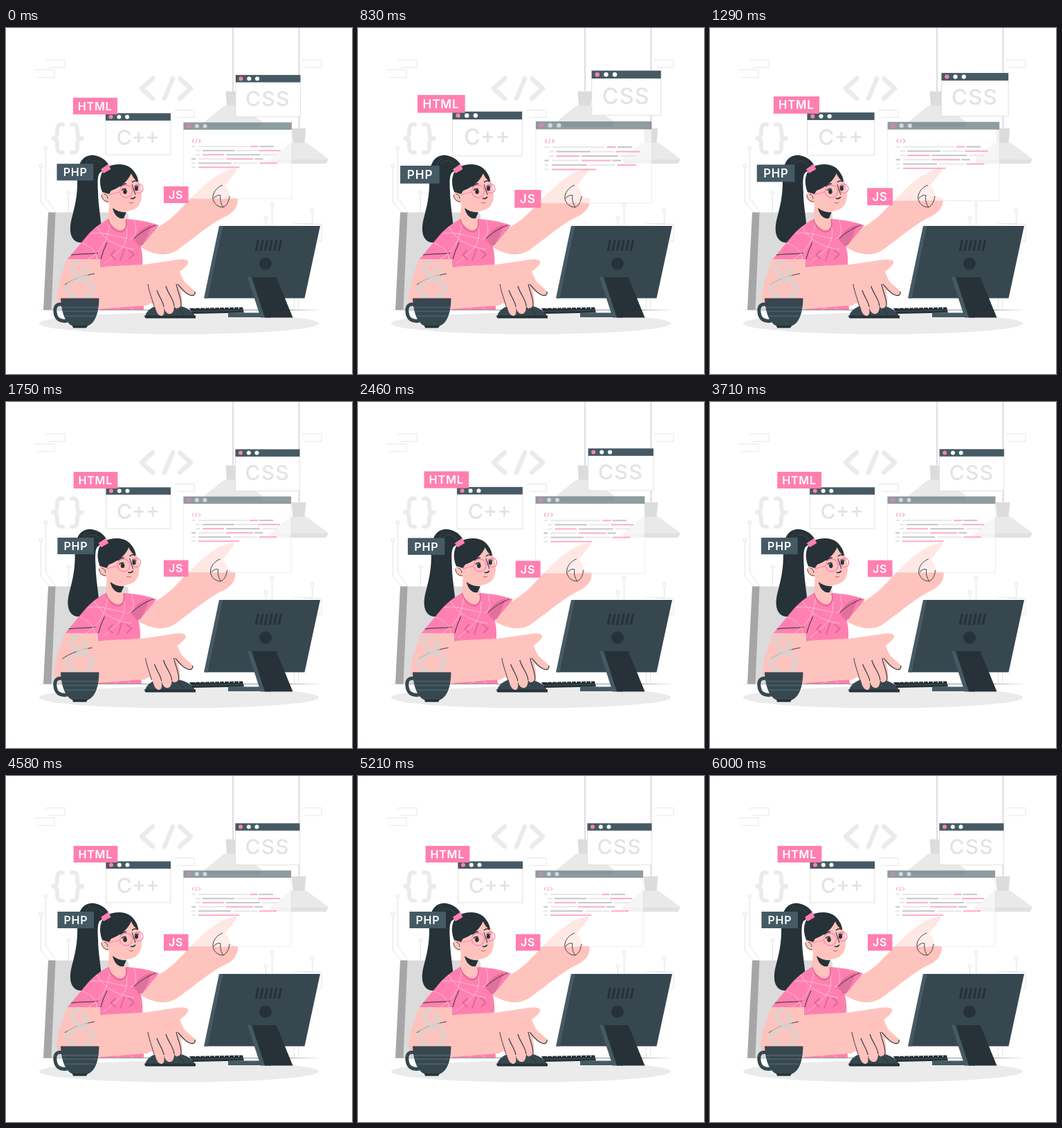
An HTML page with a canvas for the animation above (6040 ms loop, 500 by 500 pixels).

```html
<!DOCTYPE html>
<html lang="en">
<head>
<meta charset="utf-8">
<title>Coding at the desk</title>
<style>
html, body { margin: 0; width: 100%; height: 100%; overflow: hidden; background: #fff; }
canvas { display: block; width: 500px; height: 500px; }
</style>
</head>
<body>
<canvas id="c" width="500" height="500"></canvas>
<script>
const ctx = document.getElementById('c').getContext('2d');
const LOOP = 6040;
const PINK = '#ff80b0', SKIN = '#ffc3bd', INK = '#263238', SLATE = '#37474f', STEEL = '#455a64';
const PALE = '#ebebeb';

function fill(d, color) {
  ctx.fillStyle = color;
  ctx.fill(new Path2D(d));
}

function line(d, color, width = 1) {
  ctx.strokeStyle = color;
  ctx.lineWidth = width;
  ctx.stroke(new Path2D(d));
}

function disc(x, y, rx, color, ry = rx) {
  ctx.fillStyle = color;
  ctx.beginPath();
  ctx.ellipse(x, y, rx, ry, 0, 0, Math.PI * 2);
  ctx.fill();
}

function ring(x, y, r, color, width = 1) {
  ctx.strokeStyle = color;
  ctx.lineWidth = width;
  ctx.beginPath();
  ctx.arc(x, y, r, 0, Math.PI * 2);
  ctx.stroke();
}

function rect(x, y, w, h, color) {
  ctx.fillStyle = color;
  ctx.fillRect(x, y, w, h);
}

function text(s, x, y, size, weight, color, spacing) {
  ctx.font = `${weight} ${size}px Inter, sans-serif`;
  ctx.letterSpacing = spacing + 'px';
  ctx.fillStyle = color;
  ctx.fillText(s, x, y);
}

// Linear interpolation through [time, value] pairs
function track(keys, t) {
  for (let i = 1; i < keys.length; i++) {
    const [a, u] = keys[i - 1], [b, v] = keys[i];
    if (t <= b) return u + (v - u) * (t - a) / (b - a);
  }
  return keys[keys.length - 1][1];
}

const ZOOM = [[0, .005], [540, .1], [1750, 0], [2390, 0], [2900, .1], [3730, 0]];

const zoom = t => 1 + track(ZOOM, t);

// Triangle wave, first to the left; at rest before and after
function sway(t) {
  const n = (t - 202) / 1250;
  if (n < 0 || n > 4.5) return 0;
  return 3.6 * (4 * Math.abs((n + .25) % 1 - .5) - 1);
}

function background() {
  rect(0, 0, 500, 500, '#fff');
  for (const [x, y] of [[58, 46], [43, 60.5], [429, 46], [245, 118.5]])
    line(`M${x} ${y + 2}V${y}H${x + 27}V${y + 11}H${x + 3}`, '#e4e4e4', .9);
  line('M429 283.5H456V308H447', '#e4e4e4', .9);

  for (const d of ['M57.5 177V246L72 266', 'M50.5 202V252L64 268', 'M90.5 241V268',
    'M384.5 257V290', 'M375.5 278V290', 'M442.5 267V283H416', 'M416.5 390V406', 'M422.5 390V406'])
    line(d, '#e0e0e0', .9);
  for (const [x, y] of [[57.5, 174], [50.5, 199], [90.5, 238], [384.5, 254.5], [375.5, 275], [442.5, 264]])
    ring(x, y, 2.4, '#dcdcdc', .9);

  ctx.lineJoin = ctx.lineCap = 'round';
  line('M212 73L196 87.5L212 102M241 73L229 102M251 73L267 87.5L251 102', PALE, 6.5);
  line('M82 139.5C75 138 74 143 74 149C74 156 73 159 68 159.5C73 160 74 163 74 170C74 177 75 181 82 180' +
       'M95 139.5C102 138 103 143 103 149C103 156 104 159 110 159.5C104 160 103 163 103 170C103 177 102 181 95 180', PALE, 5.8);
  ctx.lineJoin = 'miter';
  ctx.lineCap = 'butt';
}

function lamp(x, y) {
  line(`M${x} 0V${y}`, '#c9c9c9', 1.2);
  fill(`M${x - 10.5} ${y}H${x + 10}L${x + 8} ${y + 22}H${x - 9}Z`, '#dcdcdc');
  fill(`M${x - 13} ${y + 21}H${x + 11}L${x + 42} ${y + 44}V${y + 46}H${x - 41}V${y + 44}Z`, '#e9e9e9');
  fill(`M${x - 41} ${y + 45}H${x + 42}L${x + 39} ${y + 51}H${x - 38}Z`, '#e0e0e0');
}

function room() {
  disc(250, 427, 202, PALE, 15.5);
  const g = ctx.createLinearGradient(45, 0, 456, 0);
  g.addColorStop(0, '#26323800');
  g.addColorStop(.1, '#263238a0');
  g.addColorStop(.88, '#263238a0');
  g.addColorStop(1, '#26323800');
  rect(45, 407, 411, .8, g);
  fill('M62 266.5H173Q177 267 177 272L184 407H65Z', '#dbdbdb');
  fill('M61 266.5H71.5L65.5 407.5H54Z', '#a6a6a6');
}

function desktop() {
  fill('M265 405L342 403.5L344 411.5L270 413Z', INK);
  for (let i = 0; i < 10; i++) rect(273 + i * 7, 403.5, 1, 2.5, '#fff');
  line('M268 409.5L343 408', '#546069', .7);
  fill('M321 411.5H372V418H321Z', STEEL);
  fill('M309 286H454L431.5 390.5H288Z', SLATE);
  fill('M308 286H313.5L291.5 390.5H286Z', STEEL);
  fill('M349 360H360L383 418.5H368Z', STEEL);
  fill('M355 360H390.5L414.5 418.5H374Z', INK);
  for (let i = 0; i < 6; i++) {
    const x = 363 + i * 6.6;
    fill(`M${x} 306H${x + 3}L${x} 322H${x - 3.5}Z`, INK);
  }
  disc(375, 340.5, 9, INK);
}

function mouse() {
  fill('M201 417C203 406 217 398 237 399C258 401 270 408 274 418Z', SLATE);
  fill('M200 415.5H274V419.5H202Q200 418 200 415.5Z', INK);
  line('M238 399Q253 405 259 417', INK, 1);
}

function pointingArm() {
  fill('M190 300L221 287C238 278 252 262 265 248C277 236 288 225 301 216C311 209 323 204 332 203' +
       'C334 205 332 209 329 212L316 228C321 233 324 238 323 242C328 247 333 244 335 247' +
       'C335 258 330 266 318 272C296 282 270 305 250 319C237 329 222 329 207 323L190 315Z', SKIN);
}

function mouseHand() {
  fill('M88 334H136L134 346C154 343 190 343 206 341L240 336C250 334 259 333 263 337C265 342 257 347 251 352' +
       'C254 359 256 365 260 369C266 374 273 379 274 383C273 387 269 388 265 386L252 378' +
       'C255 389 256 399 252 404C249 407 245 406 243 402C243 410 240 414 235 413C231 412 229 407 228 403' +
       'C229 410 229 415 225 416C219 416 217 409 215 402C211 396 209 397 204 401' +
       'C180 402 150 406 113 407C87 408 72 404 73 389C74 374 82 351 88 334Z', SKIN);
  line('M218 379C221 388 228 397 228 403', INK, 1.1);
  line('M231 373C234 384 243 393 243 402', INK, 1.1);
  line('M246 370C248 381 254 392 253 401C252 404 250 406 247 405', INK, 1.1);
  line('M248 370C254 377 260 385 266 386C271 388 274 385 273 381', INK, 1.1);
  line('M205 370C207 382 212 394 214 402', INK, .9);
  line('M85 371C96 363 111 358 128 355', INK, .9);
}

function shirt() {
  fill('M149 275C138 281 126 290 119 298L88 335H136V407H199C200 397 194 389 194 376' +
       'C195 357 201 334 194 314L198 313L221 285C207 280 191 277 174 276Z', PINK);
  fill('M184 305L193 293Q202 286 211 284L205 299L198 313L193 316Z', '#e0709c');
  line('M185 304C195 295 207 288 216 285', INK, .9);
  line('M146 310Q140 322 137 334M94 328C107 326 124 327 133 325', INK, 1);
  ctx.globalAlpha = .55;
  line('M131 287C141 305 158 316 185 320M122 297C139 293 160 302 175 304M174 288C179 315 160 325 142 340' +
       'M151 277C148 300 143 320 119 334M110 311C125 316 130 324 132 335M185 278C190 294 188 302 179 305' +
       'M145 398C164 391 180 397 196 388M160 407Q174 395 183 407', '#fff', .8);
  ctx.globalAlpha = 1;
  line('M158 321L151.5 328L158 334M171 319L165 336M177 321L185 327L178 334', '#dc6a98', 2);
}

function ponytail() {
  fill('M148 197C142 188 131 183 122 184C108 186 103 200 103 217C104 247 97 265 93.5 282' +
       'C91 298 96 309 107 310C121 312 136 307 138 294C138 279 133 256 133 237C132 219 132 209 139 207Z', INK);
  line('M122 188C113 194 111 205 112 219M140 198C132 190 125 190 119 197', '#45535a', .7);
}

function head() {
  // Neck
  fill('M148 243C150 258 148 268 147 276C152 286 160 292 166 292C174 291 175 282 172 273L173 258Z', SKIN);
  line('M148 276C151 290 162 298 170 293C174 289 175 283 173 277', '#d85787', 1.1);
  // Face
  fill('M147 230C150 220 163 208 184 210C193 217 197 232 196 244C195 256 189 262 179 264' +
       'C168 268 158 264 151 254Z', SKIN);
  fill('M154 260C161 265 167 267 174 266L170 275C162 277 156 269 154 260Z', INK);
  // Ear
  fill('M150 235C141 234 136 239 138 245C140 251 146 254 151 251Z', SKIN);
  line('M148 251C142 251 138 246 138 241M142 240Q147 241 147 247', INK, .8);
  // Hair
  fill('M139 237C133 221 136 208 146 201C156 196 171 195 180 202C187 208 191 216 191 222' +
       'C185 219 182 213 181 210C176 222 164 231 152 235L149 240Z', INK);
  fill('M137 204L148 196.5L151.5 204L141 210Z', PINK);
  // Glasses and features
  line('M149 241L164 237M182 234.5L185 233.5', PINK, 1.2);
  ring(173.5, 236, 9, PINK, 1.3);
  ring(191.5, 232, 6.5, PINK, 1.3);
  disc(172, 236.5, 2.8, INK, 3.4);
  disc(188.5, 232, 2.5, INK, 3.3);
  line('M167 235Q169 231 174 232.5M186 229Q188 227 192 229', INK, 1.1);
  line('M165 229Q169 225 174 225', INK, 1.4);
  line('M182 223Q186 219 190 222', INK, 1.6);
  line('M182 226L187 241', INK, 1);
  line('M180 246Q184 248 187 244', INK, 1.8);
  line('M178 252Q181 254 184 252', '#c9606c', 1.2);
}

function girl(dx) {
  ctx.save();
  ctx.translate(dx, 0);
  ponytail();
  pointingArm();
  shirt();
  head();
  mouseHand();
  ctx.restore();
}

function cup(t) {
  ctx.save();
  ctx.lineCap = 'round';
  ctx.globalAlpha = .75;
  const w = 1.2 * Math.sin(t / LOOP * Math.PI * 10);
  line(`M102 338C${90 + w} 345 ${95 - w} 353 106 359C${119 + w} 365 ${129 - w} 371 124 380Q121 385 117 388`, '#d8d2d0', 7);
  line(`M112 345C${121 - w} 353 ${113 + w} 362 102 365C${90 - w} 369 ${84 + w} 376 92 383Q96 386 99 388`, '#d8d2d0', 7);
  ctx.restore();

  line('M83 400C73 397 70 403 71 411C72 420 78 425 88 423', SLATE, 5);
  fill('M79 390.5H134.5C134 412 129 427 117 431H97C86 427 80 412 79 390.5Z', SLATE);
  fill('M96 430H118L116 433.5H97Z', INK);
  for (const [y, x1, x2] of [[402.5, 81, 133], [408, 82, 132], [415, 85, 129]])
    rect(x1, y, x2 - x1, 2.3, STEEL);
}

function frame(x, y, w, h) {
  rect(x, y, w, h, '#fff');
  ctx.strokeStyle = '#dedede';
  ctx.lineWidth = .9;
  ctx.strokeRect(x, y, w, h);
  rect(x, y, w, 10.5, STEEL);
  disc(x + 7.5, y + 5.2, 3, PINK);
  disc(x + 19.3, y + 5.2, 3, '#fff');
  disc(x + 31, y + 5.2, 3, '#fff');
}

// Each row: start, end, colour letter (l light, g grey, p pink)
const ROWS = [
  [268, 274, 'l', 278, 349, 'l', 352, 364, 'p', 366, 386, 'g'],
  [274, 281, 'l', 284, 330, 'g', 333, 362, 'l', 364, 396, 'p'],
  [274, 281, 'l', 284, 315, 'p', 318, 367, 'g', 370, 391, 'l'],
  [268, 274, 'g', 278, 315, 'l', 318, 357, 'p', 359, 371, 'g'],
  [268, 274, 'l', 278, 325, 'g', 328, 363, 'l', 366, 391, 'p'],
  [268, 274, 'l', 278, 337, 'p']
];
const INKS = { l: '#e4e4e4', g: '#bdbdbd', p: '#ff9dc2' };

function editor() {
  ctx.globalAlpha = .6;
  frame(256.5, 136.6, 155.5, 109.7);
  ctx.globalAlpha = .85;
  line('M271.5 160.5L269 163L271.5 165.5M275.5 160L274 166M278 160.5L281 163L278 165.5', PINK, 1);
  ROWS.forEach((row, i) => {
    for (let k = 0; k < row.length; k += 3)
      rect(row[k], 170.1 + i * 6, row[k + 1] - row[k], 2, INKS[row[k + 2]]);
  });
  ctx.globalAlpha = 1;
}

function tag(s, x, y, w, color, tx) {
  rect(x, y, w, 24, color);
  text(s, tx, y + 17.8, 16, 600, '#fff', .8);
}

function zoomed(scale, draw) {
  ctx.save();
  ctx.translate(250, 157);
  ctx.scale(scale, scale);
  ctx.translate(-250, -157);
  draw();
  ctx.restore();
}

function curledFingers(dx) {
  ctx.save();
  ctx.translate(dx, 0);
  ctx.globalAlpha = .25;
  disc(311.5, 237, 11.5, '#fff', 10.5);
  ctx.globalAlpha = 1;
  line('M313 227C304 230 298 239 299 247C301 255 307 259 314 259C320 256 322 250 323 243', INK, .9);
  line('M300 246Q306 240 310 242C309 249 311 255 314 259', INK, .9);
  ctx.restore();
}

function draw(t) {
  const s = zoom(t), dx = sway(t);
  background();
  lamp(328, 91.5);
  lamp(423.5, 145);
  room();
  zoomed(s, () => {
    frame(331.5, 68.4, 93, 60);
    text('CSS', 345.5, 113, 30, 500, '#e3e3e3', 1.2);
    frame(144.5, 123.4, 93.5, 59.6);
    text('C++', 160, 168.5, 30, 500, '#e3e3e3', 0);
  });
  mouse();
  desktop();
  girl(dx);
  cup(t);
  zoomed(s, () => {
    editor();
    tag('HTML', 97.6, 101, 63.8, PINK, 104.5);
    tag('PHP', 74.4, 196, 52.6, STEEL, 83.5);
    tag('JS', 228, 228.5, 35.5, PINK, 235);
  });
  curledFingers(dx);
}

const start = performance.now();
function tick(now) {
  draw(Math.max(0, now - start) % LOOP);
  requestAnimationFrame(tick);
}
draw(0);
requestAnimationFrame(tick);
</script>
</body>
</html>
```
